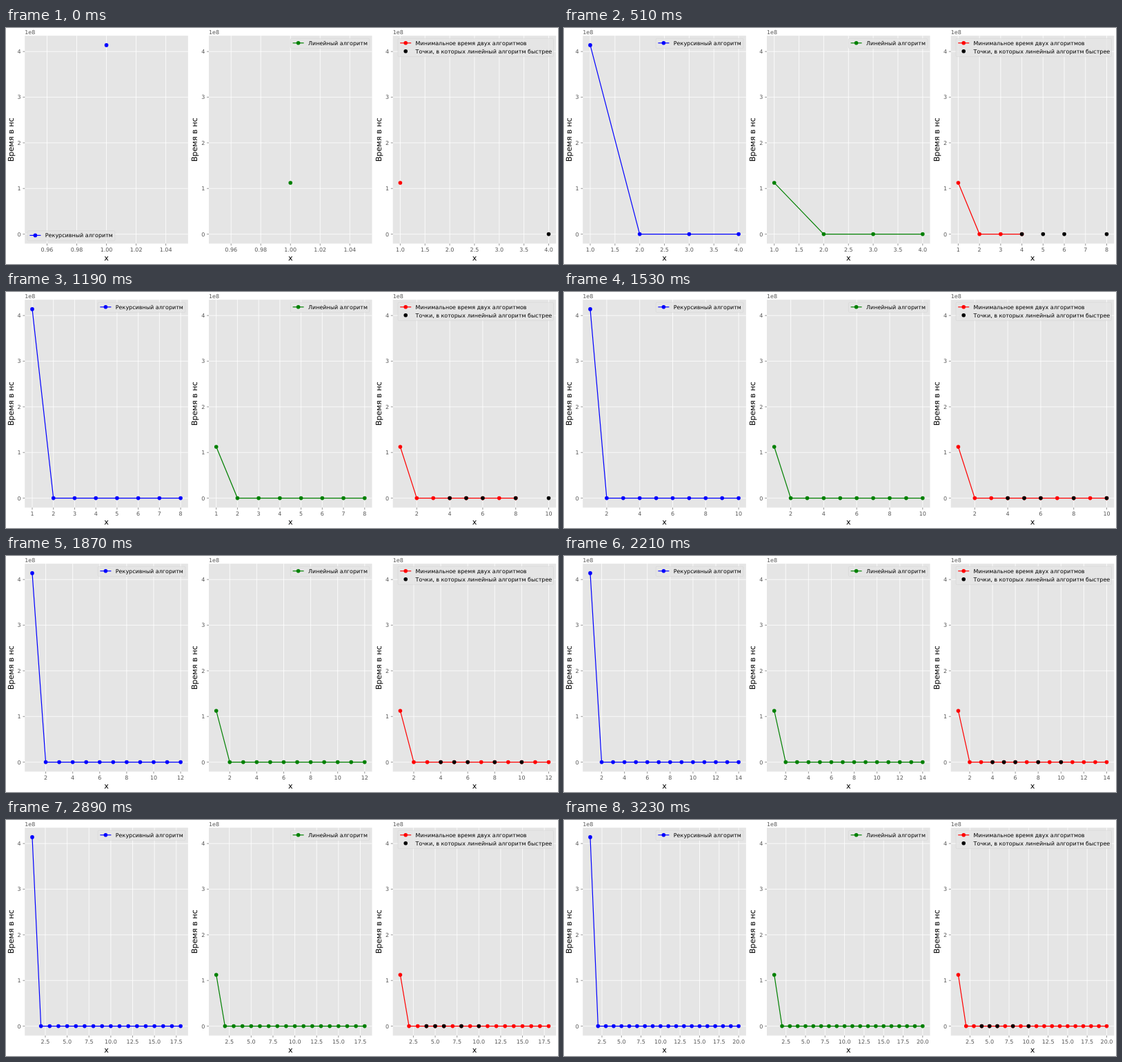
An HTML page with a canvas that plays this animation: 800 by 343 pixels, repeating every 3580 ms.

```html
<!DOCTYPE html>
<html lang="ru">
<head>
<meta charset="utf-8">
<style>
  html, body { margin: 0; width: 100%; height: 100%; overflow: hidden; background: #fff; }
  canvas { display: block; }
</style>
</head>
<body>
<canvas id="stage" width="800" height="343"></canvas>
<script>
const ctx = document.getElementById('stage').getContext('2d');
const LOOP = 3580, STEP = 170, COUNT = 20;
const TOP = 11.2, BOTTOM = 313.4, WIDTH = 236.6, PITCH = 266.7;
const FASTER = [4, 5, 6, 8, 10];
const STEPS = [0.02, 0.2, 0.25, 0.5, 1, 2, 2.5];
const yOf = v => 299.6 - 66.35 * v;

function text(str, x, y, size = 8, align = 'left', color = '#000') {
  ctx.font = size + 'px "DejaVu Sans", sans-serif';
  ctx.textAlign = align;
  ctx.fillStyle = color;
  ctx.fillText(str, x, y);
}

function path(points, color, width) {
  ctx.beginPath();
  points.forEach(([x, y]) => ctx.lineTo(x, y));
  ctx.strokeStyle = color;
  ctx.lineWidth = width;
  ctx.stroke();
}

function dots(points, color) {
  ctx.fillStyle = color;
  for (const [x, y] of points) {
    ctx.beginPath();
    ctx.arc(x, y, 2.8, 0, 7);
    ctx.fill();
  }
}

function series(points, color) {
  path(points, color, 1.2);
  dots(points, color);
}

function legend(textX, right, top, rows) {
  const left = textX - 25.6;
  ctx.beginPath();
  ctx.roundRect(left, top, right - left, 2.4 + 12 * rows.length, 1.6);
  ctx.fillStyle = 'rgba(229,229,229,.8)';
  ctx.fill();
  ctx.strokeStyle = '#ccc';
  ctx.lineWidth = 0.4;
  ctx.stroke();
  rows.forEach(([label, color, lined], i) => {
    const y = top + 6.6 + 12 * i, x = textX - 22.4;
    if (lined) path([[x, y], [x + 16, y]], color, 1.2);
    dots([[x + 8, y]], color);
    text(label, textX, y + 2.8);
  });
}

// Draws the axes and returns the x scale
function axes(index, last) {
  const left = 27.25 + PITCH * index, mid = left + WIDTH / 2;
  const pad = last > 1 ? (last - 1) * 0.05 : 0.055;
  const lo = 1 - pad, hi = last + pad;
  const xOf = v => left + (v - lo) / (hi - lo) * WIDTH;

  ctx.fillStyle = '#e5e5e5';
  ctx.fillRect(left, TOP, WIDTH, BOTTOM - TOP);

  const step = STEPS.find(s => s >= (hi - lo) / 9);
  const digits = (String(step).split('.')[1] || '').length;
  for (let k = Math.ceil(lo / step); k * step <= hi; k++) {
    const x = xOf(k * step);
    path([[x, TOP], [x, BOTTOM]], '#fff', 0.8);
    path([[x, BOTTOM], [x, BOTTOM + 2.8]], '#555', 0.64);
    text((k * step).toFixed(digits), x, 325, 8, 'center', '#555');
  }
  for (let v = 0; v <= 4; v++) {
    const y = yOf(v);
    path([[left, y], [left + WIDTH, y]], '#fff', 0.8);
    path([[left - 2.8, y], [left, y]], '#555', 0.64);
    text(v, left - 5.6, y + 2.9, 8, 'right', '#555');
  }

  text('1e8', left, 9, 8, 'left', '#555');
  text('x', mid, 338.2, 11.2, 'center');
  ctx.save();
  ctx.translate(10.6 + PITCH * index, 162.3);
  ctx.rotate(-Math.PI / 2);
  text('Время в нс', 0, 0, 11.2, 'center');
  ctx.restore();
  return xOf;
}

function draw(n) {
  ctx.fillStyle = '#fff';
  ctx.fillRect(0, 0, 800, 343);
  const curve = (xOf, first) =>
    Array.from({ length: n }, (_, i) => [xOf(i + 1), yOf(i ? 0 : first)]);
  const boxTop = TOP + 4;

  series(curve(axes(0, n), 4.14), '#00f');
  const recursive = [['Рекурсивный алгоритм', '#00f', true]];
  if (n > 1) legend(158.8, 259.9, boxTop, recursive);
  else legend(56.8, 157.9, 294.8, recursive);

  series(curve(axes(1, n), 1.125), '#008000');
  legend(438, 526.6, boxTop, [['Линейный алгоритм', '#008000', true]]);

  const faster = FASTER.slice(0, n);
  const xOf = axes(2, Math.max(n, faster[faster.length - 1]));
  series(curve(xOf, 1.125), '#f00');
  dots(faster.map(v => [xOf(v), yOf(0)]), '#000');
  legend(593.6, 793.5, boxTop, [
    ['Минимальное время двух алгоритмов', '#f00', true],
    ['Точки, в которых линейный алгоритм быстрее', '#000', false]
  ]);
}

ctx.textRendering = 'geometricPrecision';
const start = performance.now();
function tick() {
  const t = (performance.now() - start) % LOOP;
  draw(Math.min(COUNT, Math.floor(t / STEP) + 1));
  requestAnimationFrame(tick);
}
tick();
</script>
</body>
</html>
```
